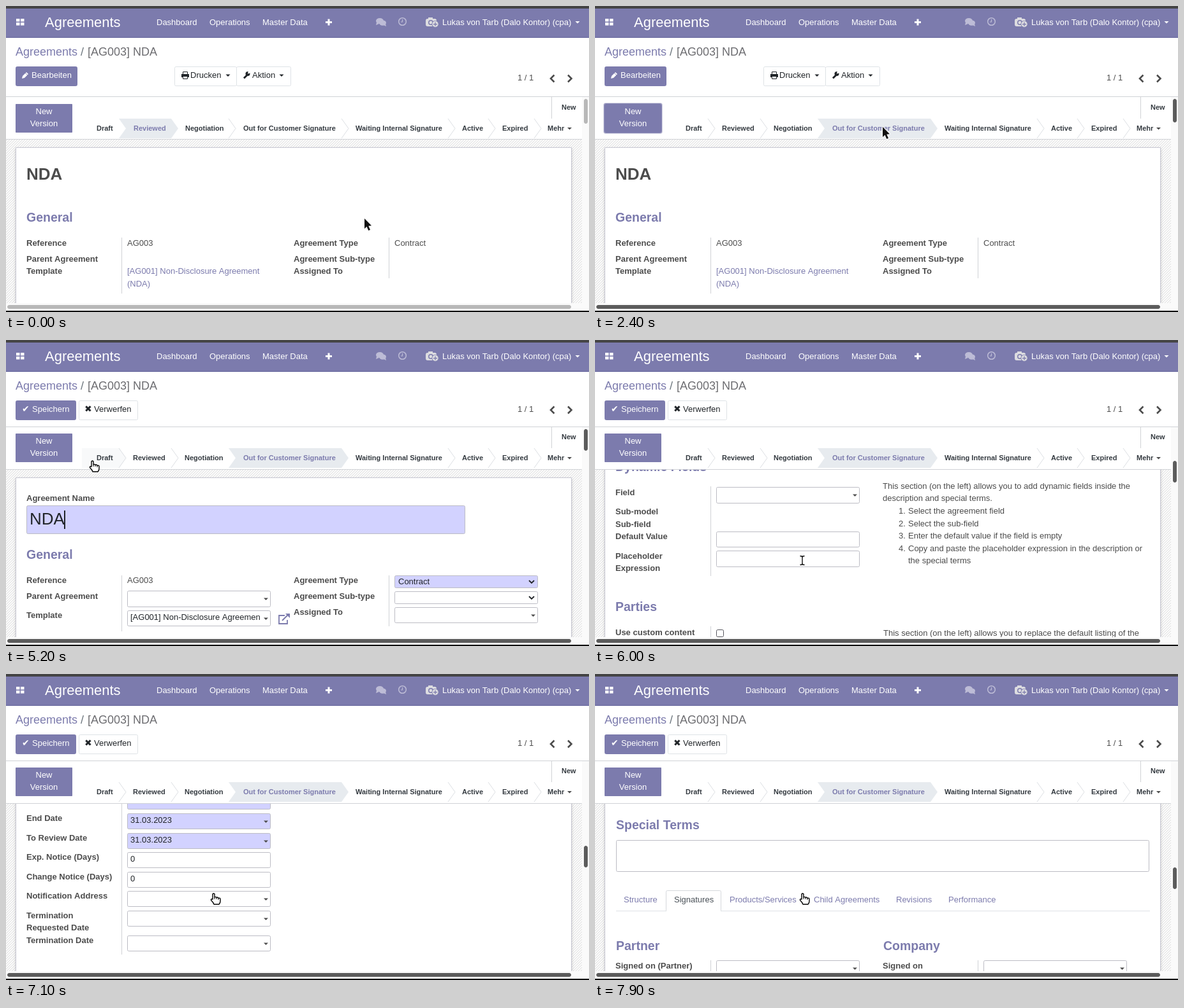
Recreate the animation shown at these times as an HTML page with a canvas. Size 914x481 px, loop 8000 ms.

```html
<!DOCTYPE html>
<html lang="en">
<head>
<meta charset="utf-8">
<title>Agreements</title>
<style>
html, body { margin: 0; height: 100%; overflow: hidden; background: #fff; }
canvas { display: block; }
</style>
</head>
<body>
<canvas width="914" height="481"></canvas>
<script>
const ctx = document.querySelector('canvas').getContext('2d');
const PURPLE = '#7c7bad', DARK = '#5f5e97', INK = '#4c4c4c', BLACK = '#212529';
const LINE = '#d0d2d6', REQUIRED = '#d2d2ff';
const LOOP = 8000, FRAME = 100;

// Pointer: time, x, y. Scroll: time, offset.
const pointerPath = [[400, 562, 334], [1300, 454, 188], [2300, 454, 188], [3200, 367, 250],
  [3900, 99, 118], [4000, 99, 118], [4900, 155, 171], [5200, 135, 191], [5500, 325, 346]];
const scrollPath = [[5700, 0], [6100, 533], [6300, 533], [7100, 1300], [7300, 1300], [7900, 1640]];
const smooth = u => u * u * (3 - 2 * u);
const easeOut = u => 1 - (1 - u) ** 2;
const progress = (t, from, to) => Math.min(1, Math.max(0, (t - from) / (to - from)));

function track(path, t, ease) {
  const next = path.findIndex(p => p[0] > t);
  if (next === 0) return path[0].slice(1);
  if (next < 0) return path[path.length - 1].slice(1);
  const a = path[next - 1], b = path[next], u = ease(progress(t, a[0], b[0]));
  return a.slice(1).map((v, i) => v + (b[i + 1] - v) * u);
}

// Drawing helpers
let mouse, cursor, originY, clipTop;

function text(s, x, y, color = INK, size = 13, bold = false, align = 'left') {
  ctx.font = `${bold ? 'bold ' : ''}${size}px "Liberation Sans", Arial, sans-serif`;
  ctx.fillStyle = color;
  ctx.textAlign = align;
  ctx.fillText(s, x, y);
}
const label = (s, x, y) => text(s, x, y, INK, 13, true);
const heading = (s, x, y) => text(s, x, y, PURPLE, 19.5, true);

function fill(color, x, y, w, h) {
  ctx.fillStyle = color;
  ctx.fillRect(x, y, w, h);
}
function box(x, y, w, h, color, border, radius = 2) {
  ctx.beginPath();
  ctx.roundRect(x + .5, y + .5, w - 1, h - 1, radius);
  ctx.fillStyle = color;
  ctx.fill();
  ctx.lineWidth = 1;
  ctx.strokeStyle = border;
  ctx.stroke();
}
function shape(points, color, closed = true) {
  ctx.beginPath();
  for (let i = 0; i < points.length; i += 2) ctx.lineTo(points[i], points[i + 1]);
  if (closed) { ctx.fillStyle = color; ctx.fill(); }
  else { ctx.strokeStyle = color; ctx.stroke(); }
}
function stroke(points, color, width = 1) {
  ctx.lineWidth = width;
  shape(points, color, false);
}
function circle(x, y, r, color) {
  ctx.beginPath();
  ctx.arc(x, y, r, 0, 7);
  ctx.fillStyle = color;
  ctx.fill();
}
const caret = (x, y, color = INK) => shape([x, y, x + 7, y, x + 3.5, y + 3.5], color);

function shifted(dy, draw) {
  originY += dy;
  ctx.save();
  ctx.translate(0, dy);
  draw();
  ctx.restore();
  originY -= dy;
}
// Tells whether the pointer is inside and picks its shape.
function over(x, y, w, h, kind = 'hand') {
  const [mx, my] = mouse, top = y + originY;
  const hit = mx >= x && mx < x + w && my >= Math.max(top, clipTop) && my < top + h;
  if (hit) cursor = kind;
  return hit;
}

// Form parts
function field(x, y, h, { value = '', color = '#fff', drop = false } = {}) {
  over(x, y, 225, h, drop ? 'hand' : 'beam');
  box(x, y, 225, h, color, '#bcbcc4');
  if (drop) caret(x + 214, y + 11.5);
  ctx.save();
  ctx.beginPath();
  ctx.rect(x, y, 209, h);
  ctx.clip();
  text(value, x + 5, y + 15, BLACK);
  ctx.restore();
}
function select(y, value, color) {
  over(609, y, 225, 20, 'arrow');
  box(609, y, 225, 20, color, '#bcbcc4');
  stroke([820, y + 8, 824, y + 12, 828, y + 8], BLACK, 1.8);
  text(value, 615, y + 14, BLACK);
}
const divider = (x, top, bottom) => fill(LINE, x, top, 1, bottom - top);

const hatch = (() => {
  const tile = document.createElement('canvas');
  tile.width = tile.height = 4;
  const c = tile.getContext('2d');
  c.fillStyle = '#fafafa';
  c.fillRect(0, 0, 4, 4);
  c.fillStyle = '#dedede';
  for (let i = 0; i < 4; i++) c.fillRect(i, 3 - i, 1, 1);
  return ctx.createPattern(tile, 'repeat');
})();

function sheet(top, height) {
  fill(hatch, 0, top - 13, 903, height + 40);
  ctx.save();
  ctx.shadowColor = 'rgba(0,0,0,.18)';
  ctx.shadowBlur = 4;
  ctx.shadowOffsetY = 2;
  fill('#fff', 15, top, 872, height);
  ctx.restore();
  box(15, top, 872, height, '#fff', '#c8c8d3', 0);
}

function navbar() {
  fill('#454545', 0, 0, 914, 4);
  fill(PURPLE, 0, 4, 914, 46);
  fill(DARK, 0, 49, 914, 1);
  for (const x of [16, 23]) for (const y of [20, 26]) fill('#fff', x, y, 5.5, 4.5);
  text('Agreements', 61, 33, '#fff', 22);
  text('Dashboard', 236, 30, '#fff');
  text('Operations', 319, 30, '#fff');
  text('Master Data', 402, 30, '#fff');
  fill('#fff', 501, 24, 10, 3);
  fill('#fff', 504.5, 20.5, 3, 10);

  const dim = '#bdbcd6';
  ctx.fillStyle = dim;
  for (const [x, y, r] of [[590.5, 26.5, 5.5], [586, 23.5, 6]]) {
    ctx.beginPath();
    ctx.ellipse(x, y, r, r * .75, 0, 0, 7);
    ctx.fill();
  }
  shape([581, 26, 585, 28, 580, 30], dim);
  shape([592, 30, 595, 28, 596, 32], dim);
  ctx.beginPath();
  ctx.arc(621.5, 24.5, 5.8, 0, 7);
  ctx.lineWidth = 1.5;
  ctx.strokeStyle = dim;
  ctx.stroke();
  stroke([621.5, 21, 621.5, 25, 619, 25], dim, 1.2);

  box(658, 20, 17, 12, '#dcdce0', '#dcdce0');
  fill('#dcdce0', 662, 18, 7, 3);
  circle(666, 26, 4, PURPLE);
  circle(666, 26, 2.5, '#dcdce0');
  circle(673, 28.5, 5.5, PURPLE);
  circle(673, 28.5, 4.7, '#dcdce0');
  fill(PURPLE, 670, 28, 6, 1.3);
  fill(PURPLE, 672.4, 25.6, 1.3, 6);
  text('Lukas von Tarb (Dalo Kontor) (cpa)', 684, 30, '#fff');
  caret(892.5, 24, '#fff');
}

function primary(w, caption, x) {
  const color = over(15, 95, w, 31) ? DARK : PURPLE;
  box(15, 95, w, 31, color, color);
  text(caption, x, 113, '#fff');
}
const symbol = (s, x, y, color) => {
  ctx.font = '14px "DejaVu Sans", sans-serif';
  ctx.fillStyle = color;
  ctx.textAlign = 'left';
  ctx.fillText(s, x, y);
};

function controlPanel(edit) {
  text('Agreements', 15, 78, PURPLE, 18);
  text('/', 117, 78, '#6c757d', 18);
  text('[AG003] NDA', 128, 78, '#6c6c70', 18);
  if (edit) {
    primary(95, 'Speichern', 41);
    symbol('✔', 25, 113, '#fff');
    over(114, 95, 93, 31);
    box(114, 95, 93, 31, '#fff', '#dee2e6');
    symbol('✖', 123, 113, BLACK);
    text('Verwerfen', 138, 113, BLACK);
  } else {
    primary(97, 'Bearbeiten', 40);
    shape([25, 114, 26, 110, 32, 104, 35, 107, 29, 113], '#fff');
    stroke([30, 105, 34, 109], PURPLE, .8);
    over(264, 95, 183, 31);
    box(264, 95, 98, 31, '#fff', '#dee2e6');
    box(361, 95, 86, 31, '#fff', '#dee2e6');
    box(277, 103, 8, 5, '#fff', BLACK, 0);
    fill(BLACK, 275, 107, 12, 5);
    box(277, 110, 8, 5, '#fff', BLACK, 0);
    text('Drucken', 289, 113, BLACK);
    caret(344.5, 107.5, BLACK);
    stroke([373, 113.5, 379, 107.5], BLACK, 3);
    circle(379, 106.5, 3.5, BLACK);
    shape([379, 106.5, 380, 102, 384, 105], '#fff');
    text('Aktion', 386, 113, BLACK);
    caret(428.5, 107.5, BLACK);
  }
  shifted(edit ? -4 : 0, () => {
    text('1 / 1', 802, 117);
    stroke([859.5, 108.5, 854, 114, 859.5, 119.5], INK, 2.6);
    stroke([881, 108.5, 886.5, 114, 881, 119.5], INK, 2.6);
  });
}

const stages = [['Draft', 142], ['Reviewed', 199], ['Negotiation', 280], ['Out for Customer Signature', 372],
  ['Waiting Internal Signature', 548], ['Active', 715], ['Expired', 778], ['Mehr', 849]];
const edges = [119, 177, 259, 349, 526, 693, 756, 828, 892];

function statusBar(active, focus) {
  if (focus) {
    ctx.globalAlpha = focus;
    box(13, 152, 93, 49, '#bebdd6', '#d5d5e5', 3);
    box(14, 153, 91, 47, '#bebdd6', '#8a89b6', 2);
    ctx.globalAlpha = 1;
  }
  const color = over(15, 154, 89, 45) ? DARK : PURPLE;
  box(15, 154, 89, 45, color, color, focus ? 1 : 0);
  text('New', 59.5, 170, '#fff', 13, false, 'center');
  text('Version', 59.5, 189, '#fff', 13, false, 'center');
  fill(LINE, 855, 143, 1, 34);
  text('New', 871, 163, '#343a40', 11, true);

  stages.forEach(([name, x], i) => {
    const left = edges[i], right = edges[i + 1], on = i === active;
    const hot = over(left + 5, 177, right - left, 31, on ? 'arrow' : 'hand');
    if (on || hot) shape([left, 177, right, 177, right + 11, 192.5, right, 208, left, 208, left + (i ? 11 : 0), 192.5],
      on ? '#e7ebef' : '#f8f9fa');
    if (i && !on && i - 1 !== active) stroke([left, 177, left + 11, 192.5, left, 208], '#dcdfe3');
    const nudge = active === 1 && (i === 1 || i === 2);
    text(name, x + nudge, 196, on ? PURPLE : '#343a40', 11, true);
  });
  caret(880, 191);
}

function readForm() {
  sheet(222, 500);
  text('NDA', 32, 273, INK, 26, true);
  heading('General', 32, 339);
  label('Reference', 32, 377);
  label('Parent Agreement', 32, 402);
  label('Template', 32, 421);
  divider(181, 364, 452);
  text('AG003', 190, 377);
  text('[AG001] Non-Disclosure Agreement', 190, 421, PURPLE);
  text('(NDA)', 190, 441, PURPLE);
  label('Agreement Type', 451, 377);
  label('Agreement Sub-type', 451, 402);
  label('Assigned To', 451, 421);
  divider(600, 364, 428);
  text('Contract', 609, 377);
}

const drop = { drop: true };
const dated = { value: '31.03.2023', color: REQUIRED, drop: true };
const zero = { value: '0' };

function generalSection() {
  label('Agreement Name', 32, 253);
  over(32, 260, 688, 45, 'beam');
  box(32, 260, 688, 45, REQUIRED, '#bcbcc4');
  text('NDA', 37, 290, BLACK, 26);
  fill(BLACK, 91, 268, 2, 29);
  heading('General', 32, 344);
  label('Reference', 32, 382);
  label('Parent Agreement', 32, 407);
  label('Template', 32, 437);
  divider(181, 370, 458);
  text('AG003', 190, 382);
  field(190, 394, 26, drop);
  field(190, 425, 25, { value: '[AG001] Non-Disclosure Agreement (NDA)', drop: true });
  stroke([437, 433, 428, 433, 428, 446, 441, 446, 441, 440], PURPLE, 1.8);
  stroke([433, 441, 443, 431], PURPLE, 2);
  shape([438, 430, 445, 430, 445, 437], PURPLE);
  label('Agreement Type', 451, 382);
  label('Agreement Sub-type', 451, 407);
  label('Assigned To', 451, 432);
  divider(600, 370, 450);
  select(370, 'Contract', REQUIRED);
  select(395, '', '#fff');
  field(609, 420, 25, drop);
}

function placeholderSection() {
  heading('Description', 32, 513);
  box(32, 532, 837, 110, '#fff', '#bcbcc4');
  heading('Dynamic Fields', 32, 706);
  [['Field', 744], ['Sub-model', 774], ['Sub-field', 794], ['Default Value', 813],
    ['Placeholder', 844], ['Expression', 863]].forEach(([s, y]) => label(s, 32, y));
  divider(181, 730, 871);
  field(190, 731, 26, drop);
  field(190, 801, 25);
  field(190, 831, 26);
  text('This section (on the left) allows you to add dynamic fields inside the', 451, 734);
  text('description and special terms.', 451, 753);
  ['Select the agreement field', 'Select the sub-field', 'Enter the default value if the field is empty',
    'Copy and paste the placeholder expression in the description or', 'the special terms'].forEach((s, i) => {
    const y = 773 + Math.round(i * 19.5);
    if (i < 4) text(`${i + 1}.`, 476, y);
    text(s, 491, y);
  });
}

function partiesSection() {
  heading('Parties', 32, 926);
  label('Use custom content', 32, 964);
  divider(181, 950, 976);
  box(190, 955, 12, 12, '#fff', '#55555c');
  text('This section (on the left) allows you to replace the default listing of the', 452, 965);
  text('parties.', 452, 984);
  ['Partner', 'Company'].forEach((s, i) => {
    const x = 32 + 419 * i;
    heading(s, x, 1050);
    label(s, x, 1088);
    label('Contact', x, 1119);
    divider(x + 149, 1074, 1140);
    field(x + 158, 1075, 25, drop);
    field(x + 158, 1106, 25, drop);
  });
}

function datesSection() {
  heading('Term Dates', 32, 1462);
  divider(181, 1486, 1741);
  [['Start Date', 1500, dated], ['End Date', 1531, dated], ['To Review Date', 1562, dated],
    ['Exp. Notice (Days)', 1592, zero], ['Change Notice (Days)', 1623, zero],
    ['Notification Address', 1653, drop], ['Termination', 1684, drop],
    ['Termination Date', 1723, drop]].forEach(([s, y, options]) => {
    label(s, 32, y);
    field(190, y - 12, 25, options);
  });
  label('Requested Date', 32, 1703);
}

function termsSection() {
  heading('Special Terms', 33, 1884);
  over(33, 1901, 836, 50, 'beam');
  box(33, 1901, 836, 50, '#fff', '#bcbcc4');
  fill('#dee2e6', 33, 2012, 837, 1);
  box(111, 1980, 87, 34, '#fff', '#d5d8dc');
  fill('#fff', 112, 2012, 85, 3);
  [['Structure', 45], ['Signatures', 124], ['Products/Services', 211], ['Child Agreements', 343],
    ['Revisions', 472], ['Performance', 554]].forEach(([s, x], i) => {
    text(s, x, 1999, i === 1 ? '#495057' : PURPLE);
    over(x - 13, 1980, ctx.measureText(s).width + 26, 33);
  });
  [['Partner', 'Signed on (Partner)'], ['Company', 'Signed on']].forEach(([title, s], i) => {
    const x = 32 + 419 * i;
    heading(title, x + 1, 2074);
    label(s, x, 2103);
    divider(x + 149, 2090, 2200);
    field(x + 158, 2090, 25, drop);
  });
}

function editForm() {
  sheet(216, 3200);
  generalSection();
  placeholderSection();
  partiesSection();
  datesSection();
  termsSection();
}

function scrollbars(t, edit, scroll, saved) {
  fill('#fafafa', 903, edit ? 137 : 143, 11, 330);
  fill('#fafafa', 0, 467, 914, 12);
  fill('#000', 0, 479, 914, 2);
  const shade = Math.round(184 - 92 * progress(t, 400, 700));
  const color = `rgb(${shade},${shade},${shade})`;
  const [y, h] = edit ? [140 + scroll / 10, 34] : [146, saved ? 37 : 39];
  box(906, y, 6, h, color, color, 3);
  box(2, 470, 884, 6, color, color, 3);
}

function drawCursor() {
  ctx.save();
  ctx.translate(...mouse.map(Math.round));
  ctx.lineJoin = 'round';
  if (cursor === 'beam') {
    const beam = [-3.5, -6.5, -.5, -6, 0, -5, .5, -6, 3.5, -6.5];
    const both = [beam, beam.map((v, i) => i % 2 ? -v + 1 : v), [0, -5, 0, 6]];
    for (const p of both) stroke(p, '#fff', 3);
    for (const p of both) stroke(p, '#000', 1.3);
  } else if (cursor === 'hand') {
    const hand = new Path2D('M-1 8V0Q.5-2 2 0V5Q4 3.500 5 5.500Q7 4 8 6.500Q11 5.500 11 8V11Q11 14 9 16H1Q0 13-3.500 9.500Q-4 7-1 8Z');
    ctx.fillStyle = '#fff';
    ctx.fill(hand);
    ctx.lineWidth = 1.4;
    ctx.strokeStyle = '#000';
    ctx.stroke(hand);
    stroke([2, 5, 2, 8], '#000');
    stroke([5, 6, 5, 8], '#000');
    stroke([8, 7, 8, 9], '#000');
  } else {
    const arrow = [0, 0, 0, 16, 3.5, 12.7, 6.3, 19, 9, 17.8, 6.3, 11.7, 11, 11.3, 0, 0];
    stroke(arrow, '#fff', 2);
    shape(arrow, '#111');
  }
  ctx.restore();
}

function render(t) {
  const edit = t >= 5000, saved = t >= 1700;
  const [scroll] = track(scrollPath, t, easeOut);
  mouse = track(pointerPath, t, smooth);
  cursor = 'arrow';
  originY = clipTop = 0;

  fill('#fff', 0, 0, 914, 481);
  const top = edit ? 204 : 210;
  ctx.save();
  ctx.beginPath();
  ctx.rect(0, top, 903, 467 - top);
  ctx.clip();
  clipTop = top;
  shifted(-Math.round(scroll), edit ? editForm : readForm);
  clipTop = 0;
  ctx.restore();

  navbar();
  controlPanel(edit);
  fill(LINE, 0, top - 68, 914, 1);
  fill(LINE, 0, top - 1, 903, 1);
  const focus = edit ? 0 : progress(t, 1600, 1900);
  shifted(edit ? -7 : 0, () => statusBar(saved ? 3 : 1, focus));
  scrollbars(t, edit, scroll, saved);
  drawCursor();
}

function tick(now) {
  render(Math.floor((now % LOOP) / FRAME) * FRAME);
  requestAnimationFrame(tick);
}
render(0);
requestAnimationFrame(tick);
</script>
</body>
</html>
```
